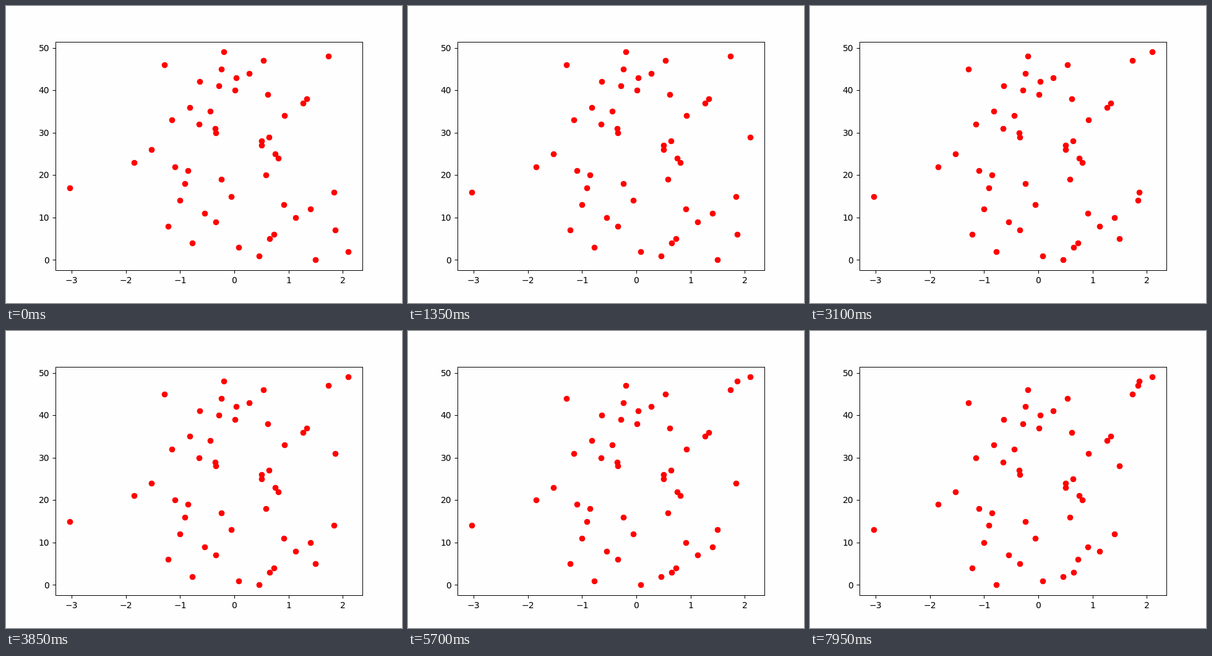
These frames come from a looping animation (640 by 480 pixels, 8000 ms). An HTML page:

```html
<!DOCTYPE html>
<html lang="en">
<head>
<meta charset="utf-8">
<title>Bubble sort scatter</title>
<style>
  html, body { margin: 0; width: 100%; height: 100%; overflow: hidden; background: #fefefe; }
  svg { display: block; width: 640px; height: 480px; }
  text { font: 13.889px "DejaVu Sans", sans-serif; letter-spacing: -1px; }
  #axes { fill: none; stroke: #000; stroke-width: 1; }
  #dots { fill: #f00; }
</style>
</head>
<body>
<svg viewBox="0 0 640 480">
  <g id="axes"><rect x="80.5" y="58.5" width="496" height="369"/></g>
  <g id="labels"></g>
  <g id="dots"></g>
</svg>
<script>
const STEP = 50, FRAMES = 160;
const DIGIT = 8.875, MINUS = 11.625; // label advance widths

// The random sample being sorted, as horizontal pixels; all later orders are computed.
const sample = [
  500, 409, 553, 376, 301, 426, 433, 532, 262, 339,
  468, 321, 492, 449, 281, 364, 530, 103, 289, 348,
  420, 294, 273, 207, 440, 435, 235, 413, 413, 425,
  339, 338, 312, 268, 450, 330, 297, 480, 486, 423,
  370, 344, 313, 372, 393, 348, 256, 416, 521, 352
];

const plotX = value => 369.05 + 87.65 * value;
const plotY = index => 410.4 - 336 / 49 * index;
const snap = p => Math.round(p) + 0.5;

function add(parent, tag, attributes, content = "") {
  const node = document.createElementNS("http://www.w3.org/2000/svg", tag);
  for (const name in attributes) node.setAttribute(name, attributes[name]);
  node.textContent = content;
  return document.getElementById(parent).appendChild(node);
}

// Labels start on whole pixels; align is 0.5 for centred and 1 for right-aligned.
function addLabel(number, x, baseline, align) {
  const digits = String(Math.abs(number));
  const width = digits.length * DIGIT + (number < 0 ? MINUS : 0);
  const left = Math.round(x - width * align + 0.5);
  add("labels", "text", { x: left, y: Math.round(baseline) }, (number < 0 ? "\u2212" : "") + digits);
}

for (let value = -3; value <= 2; value++) {
  const x = plotX(value);
  add("axes", "path", { d: `M${snap(x)} 427.5v5` });
  addLabel(value, x, 448, 0.5);
}
for (let index = 0; index <= 50; index += 10) {
  const y = plotY(index);
  add("axes", "path", { d: `M80.5 ${snap(y)}h-5` });
  addLabel(index, 70.28, y + 5.2, 1);
}

// Bubble sort, yielding the order after every swap.
function* bubbleSort(list) {
  yield list.slice();
  for (let pass = 0; pass < list.length; pass++) {
    // The first pass is already under way.
    for (let i = pass ? 0 : 2; i < list.length - 1; i++) {
      if (list[i] <= list[i + 1]) continue;
      [list[i], list[i + 1]] = [list[i + 1], list[i]];
      yield list.slice();
    }
  }
}

const orders = [...bubbleSort(sample.slice())];
const dots = sample.map((_, index) => add("dots", "circle", { cy: snap(plotY(index)), r: 4.86 }));

function draw() {
  const order = orders[Math.floor(performance.now() / STEP) % FRAMES];
  dots.forEach((dot, index) => dot.setAttribute("cx", order[index] + 0.5));
  requestAnimationFrame(draw);
}
draw();
</script>
</body>
</html>
```
